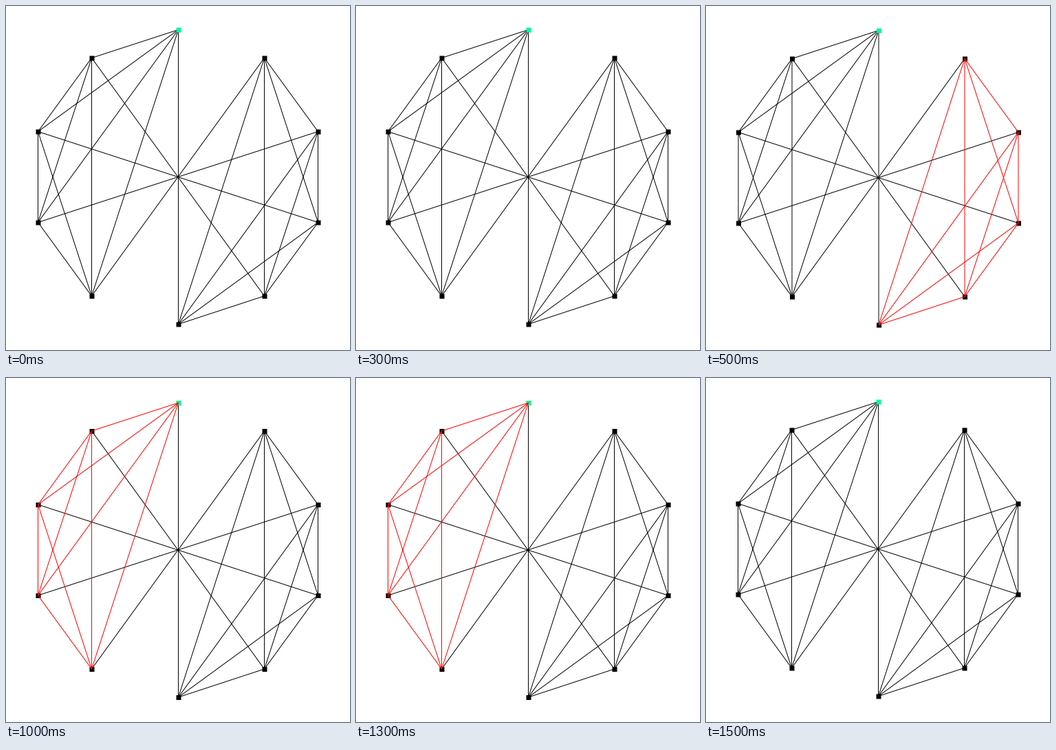
Recreate the animation shown at these times as a matplotlib script. Size 500 by 500 pixels, loop 2000 ms.

```python
import math
from itertools import combinations

import matplotlib.pyplot as plt
from matplotlib.animation import FuncAnimation
from matplotlib.collections import LineCollection
from matplotlib.patches import Rectangle

SIZE, DPI = 500, 100
CENTER, RADIUS = (250, 248.5), 214
COUNT, NODE = 10, 7
RED, BLACK, GREEN = "#ff0000", "#000000", "#00fa9a"

# Per step: drawing offset and highlighted half
STEPS = [
    ((0, 0), None),
    ((0.5, 1), "right"),
    ((0, 1.5), "left"),
    ((0, 0), None),
]


def node_at(i):
    """Node i on a half-pixel grid, counted anticlockwise from the top."""
    a = 2 * math.pi * i / COUNT
    x = CENTER[0] - RADIUS * math.sin(a)
    y = CENTER[1] - RADIUS * math.cos(a)
    return round(x) + 0.5 * (i % 5 == 0) - 0.5 * (i % 5 != 0), round(y + 0.5) - 0.5


def grid(v):
    """Nearest pixel centre, halves rounding up despite float noise."""
    return math.floor(round(v, 6)) + 0.5


def ring(i):
    a = 2 * math.pi * i / COUNT
    return (grid(CENTER[0] - RADIUS * math.sin(a)),
            grid(CENTER[1] - RADIUS * math.cos(a)))


nodes = [ring(i) for i in range(COUNT)]
half = COUNT // 2
edges = {
    "cross": [(i, i + half) for i in range(half)],
    "left": list(combinations(range(half), 2)),
    "right": list(combinations(range(half, COUNT), 2)),
}

fig = plt.figure(figsize=(SIZE / DPI, SIZE / DPI), dpi=DPI, facecolor="white")
ax = fig.add_axes([0, 0, 1, 1])
ax.set_xlim(0, SIZE)
ax.set_ylim(SIZE, 0)
ax.axis("off")

lines = {}
for name in edges:
    lines[name] = LineCollection([], linewidths=72 / DPI)
    lines[name].set_snap(False)
    ax.add_collection(lines[name], autolim=False)

squares = []
for i in range(COUNT):
    square = Rectangle((0, 0), NODE, NODE, lw=0, fc=BLACK if i else GREEN,
                       zorder=5, snap=False)
    squares.append(ax.add_patch(square))


def draw(step):
    (dx, dy), hot = STEPS[step]
    points = [(x + dx, y + dy) for x, y in nodes]
    for name, pairs in edges.items():
        lines[name].set_segments([(points[a], points[b]) for a, b in pairs])
        lines[name].set_color(RED if name == hot else BLACK)
        lines[name].set_zorder(6 if name == hot else 2)
    # Squares sit half a pixel right of and below the line ends
    for square, (x, y) in zip(squares, points):
        square.set_xy((x + 0.5 - NODE / 2, y + 0.5 - NODE / 2))
    return [*lines.values(), *squares]


anim = FuncAnimation(fig, draw, frames=len(STEPS), interval=500,
                     init_func=lambda: draw(0), repeat=True, repeat_delay=0)
plt.show()
```
